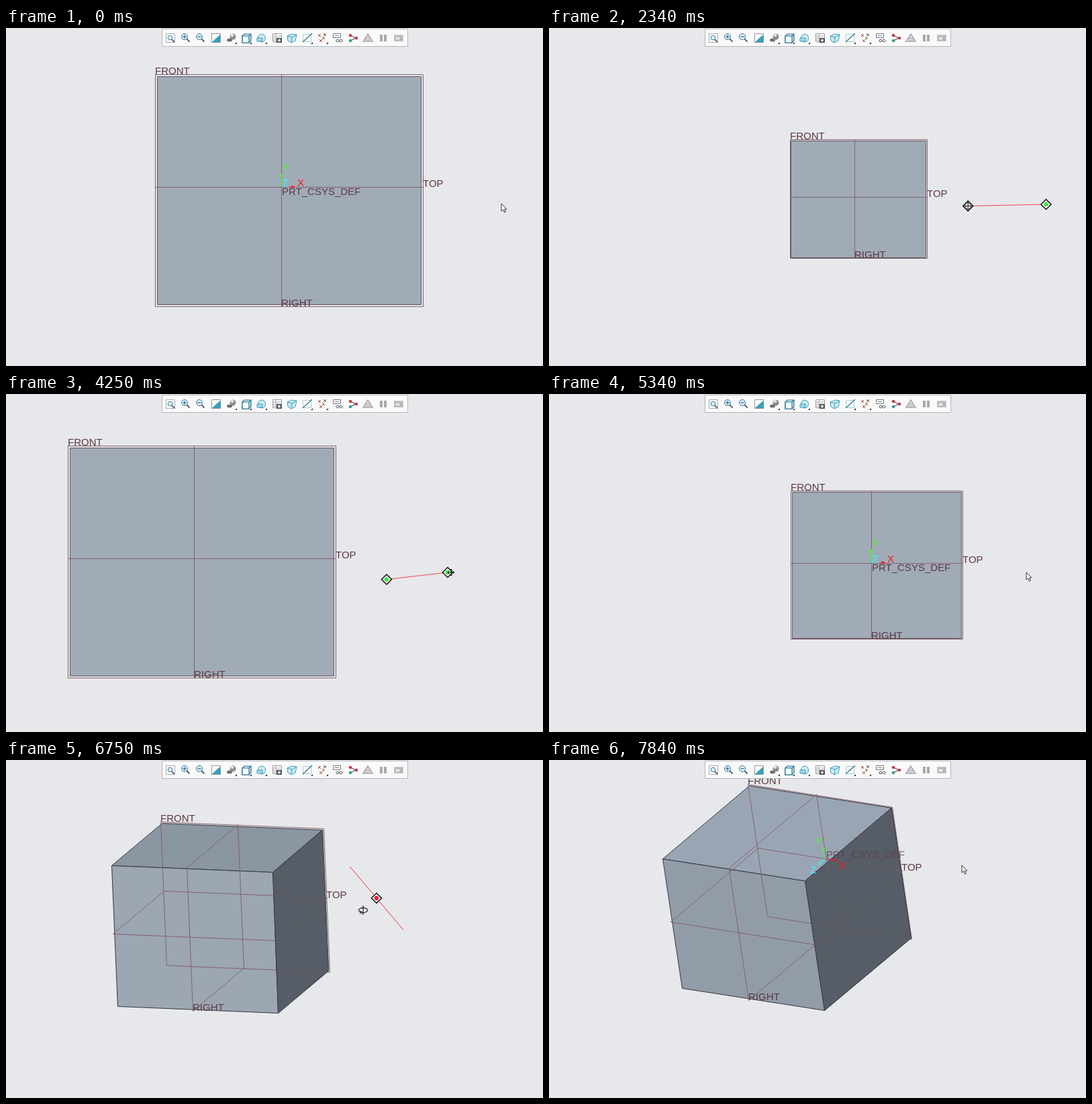
An HTML page with a canvas for the animation above (8 s loop, 800 by 504 pixels).

```html
<!DOCTYPE html>
<html lang="en">
<head>
<meta charset="utf-8">
<title>Model view navigation</title>
<style>
html, body { margin: 0; width: 100%; height: 100%; overflow: hidden; background: #e7e8eb; }
canvas { display: block; }
</style>
</head>
<body>
<canvas id="stage" width="800" height="504"></canvas>
<script>
const ctx = document.getElementById('stage').getContext('2d');
const FONT = '15px "Liberation Sans", Arial, sans-serif';
const MAROON = '#5c3844', PLANE = '#84626d';
const LOOP = 8000, BEATS = [340, 250, 170, 90, 0];

// Pointer path: time, x, y
const PATH = [
  [0, 738, 262], [340, 758, 275], [500, 759, 276], [840, 743, 264], [1090, 742, 264],
  [1340, 740.5, 263], [2000, 740.5, 263], [2340, 624.2, 265.4], [2500, 600, 268],
  [2750, 568.8, 276], [3000, 624, 272], [3500, 627, 272], [3840, 567, 276.5],
  [4000, 567, 276.5], [4250, 658, 266], [4340, 714, 266], [4500, 722, 266],
  [4750, 724, 265], [5000, 719, 266], [5250, 718, 265], [5340, 711, 266],
  [5500, 712, 267], [5840, 541, 264], [6000, 524, 263.4], [6250, 552, 206],
  [6340, 552, 206], [6750, 532, 224], [7340, 515, 239], [7500, 515, 239], [7840, 615, 157]
];
const PANS = [
  { from: 2000, to: 2750, lag: 0 },
  { from: 4000, to: 4750, lag: 5 },
  { from: 5500, to: 6000, lag: 0 }
];
const ZOOMS = [
  { times: [1000, 1090, 1170], factor: 0.8, x: 740.5, y: 263.4 },
  { times: [3170, 3340, 3500], factor: 1.25, x: 620, y: 271.1 },
  { times: [5170, 5250], factor: 0.8, x: 718.7, y: 265.7 }
];
const SPIN = { from: 6340, to: 7500, x: 552, y: 206, w: -139, axis: [0.645, 0.764], rate: 0.869 };

// Block and datum extents around the model origin, y pointing down
const BLOCK = { l: -185, r: 208, t: -165, b: 175, n: 0, f: 385 };
const DATUM = { l: -188, r: 211, t: -168, b: 178, n: -3, f: 388 };

const mix = (a, b, k) => a + (b - a) * k;
const rgb = (a, b, k) => `rgb(${a.map((v, i) => Math.round(mix(v, b[i], k)))})`;

function pointer(t) {
  const i = PATH.findIndex(p => p[0] > t);
  if (i < 0) return PATH[PATH.length - 1].slice(1);
  const a = PATH[i - 1], b = PATH[i], k = (t - a[0]) / (b[0] - a[0]);
  return [mix(a[1], b[1], k), mix(a[2], b[2], k)];
}

function viewAt(t) {
  let x = 410, y = 237, s = 1;
  ZOOMS.forEach((z, i) => {
    for (const at of z.times) if (t >= at) {
      x = z.x + (x - z.x) * z.factor;
      y = z.y + (y - z.y) * z.factor;
      s *= z.factor;
    }
    const pan = PANS[i];
    if (t >= pan.from) {
      const a = pointer(pan.from), b = pointer(Math.min(t, pan.to));
      x += b[0] - a[0];
      y += b[1] - a[1];
    }
  });
  let angle = 0;
  if (t > SPIN.from) {
    const [px, py] = pointer(Math.min(t, SPIN.to));
    angle = Math.hypot(px - SPIN.x, py - SPIN.y) * SPIN.rate * Math.PI / 180;
  }
  return { x, y, s, angle };
}

// Turn a vector about the spin axis lying in the screen plane
function turn(x, y, z, angle) {
  const [ax, ay] = SPIN.axis;
  const along = x * ax + y * ay;
  const across = (y * ax - x * ay) * Math.cos(angle) + z * Math.sin(angle);
  return [along * ax - across * ay, along * ay + across * ax];
}

function projector(v) {
  return (x, y, z) => {
    if (!v.angle) return [v.x + x * v.s, v.y + y * v.s];
    const p = turn(v.x - SPIN.x + x * v.s, v.y - SPIN.y + y * v.s, SPIN.w + z * v.s, v.angle);
    return [SPIN.x + p[0], SPIN.y + p[1]];
  };
}

function shape(points, fill, stroke, width = 1, closed = true) {
  ctx.beginPath();
  points.forEach(p => ctx.lineTo(p[0], p[1]));
  if (closed) ctx.closePath();
  if (fill) { ctx.fillStyle = fill; ctx.fill(); }
  if (stroke) { ctx.strokeStyle = stroke; ctx.lineWidth = width; ctx.stroke(); }
}
const line = (color, width, ...points) => shape(points, null, color, width, false);
const box = (x, y, w, h, fill, stroke) => shape([[x, y], [x + w, y], [x + w, y + h], [x, y + h]], fill, stroke);
const snap = p => p.map(c => Math.round(c - 0.01) + 0.5);

function ring(x, y, rx, ry, fill, stroke, width = 1) {
  ctx.beginPath();
  ctx.ellipse(x, y, rx, ry, 0, 0, 7);
  if (fill) { ctx.fillStyle = fill; ctx.fill(); }
  if (stroke) { ctx.strokeStyle = stroke; ctx.lineWidth = width; ctx.stroke(); }
}

function label(text, x, y, color = MAROON) {
  ctx.font = FONT;
  ctx.fillStyle = color;
  ctx.fillText(text, Math.round(x), Math.round(y));
}

function drawModel(v, at) {
  const quad = (pts, fill, stroke) => shape(pts.map(p => snap(at(...p))), fill, stroke);
  const { l, r, t, b, n, f } = BLOCK, d = DATUM;
  const k = v.angle / 0.75;
  const edge = v.angle ? '#34363d' : '#5c545f';
  const side = () => quad([[r, t, n], [r, t, f], [r, b, f], [r, b, n]], '#585d67', edge);
  if (v.angle) {
    quad([[l, t, n], [r, t, n], [r, t, f], [l, t, f]], rgb([122, 131, 142], [154, 165, 180], k), edge);
    side();
  }
  quad([[l, t, f], [r, t, f], [r, b, f], [l, b, f]], rgb([160, 171, 183], [146, 156, 169], k * k), edge);

  quad([[d.l, d.t, 0], [d.r, d.t, 0], [d.r, d.b, 0], [d.l, d.b, 0]], null, PLANE);
  quad([[d.l, 0, d.n], [d.r, 0, d.n], [d.r, 0, d.f], [d.l, 0, d.f]], null, PLANE);
  quad([[0, d.t, d.n], [0, d.b, d.n], [0, d.b, d.f], [0, d.t, d.f]], null, PLANE);
  if (v.angle) {
    // Datum lines barely show through the dark face
    ctx.globalAlpha = 0.7;
    side();
    ctx.globalAlpha = 1;
  }
  label('FRONT', ...at(d.l, d.t, 0));
  label('TOP', ...at(d.r, 0, 0));
  label('RIGHT', ...at(0, d.b, d.f));
}

function drawAxes(v, at) {
  const [x, y] = at(0, 0, 0);
  ctx.globalAlpha = v.angle ? 0.75 : 1;
  label('PRT_CSYS_DEF', x + 1, y + (v.angle ? -1 : 12));
  ctx.globalAlpha = 1;
  const axes = [['X', '#ff1018', [1, 0, 0]], ['Y', '#48ff20', [0, -1, 0]], ['Z', '#30fcff', [0, 0, 1]]];
  for (const [name, color, dir] of axes) {
    const [dx, dy] = v.angle ? turn(...dir, v.angle) : dir;
    const start = v.angle || name === 'Y' ? 0 : 13;
    const len = Math.hypot(dx, dy);
    if (len > 0.1) {
      const tip = [x + dx * 20, y + dy * 20];
      line(color, 1.2, [x + dx * start, y + dy * start], tip);
      for (const side of [-2, 2])
        line(color, 1, tip, [tip[0] - dx * 5 - dy * side, tip[1] - dy * 5 + dx * side]);
    }
    label(name, x + dx * 23 + (dx < -0.01 ? -11 : 1), y + dy * 23 + (dy > 0.01 ? 11 : -1), color);
  }
}

function diamond(x, y, dot) {
  shape([[x, y - 7.5], [x + 7.5, y], [x, y + 7.5], [x - 7.5, y]], '#fff', '#111', 1.5);
  if (dot) ring(x, y, 3.2, 3.2, dot);
}

function arrow(x, y) {
  shape([[0, 0], [0, 11], [2.6, 8.7], [4.6, 13], [6.4, 12.2], [4.5, 8], [8, 8]]
    .map(p => [x + p[0], y + p[1]]), '#fff', '#30323c');
}

function moveCross(x, y) {
  line('#111', 1, [x - 5, y], [x + 5, y]);
  line('#111', 1, [x, y - 5], [x, y + 5]);
  for (const [dx, dy] of [[1, 0], [-1, 0], [0, 1], [0, -1]])
    line('#111', 1, [x + dx * 3 - dy * 2, y + dy * 3 + dx * 2], [x + dx * 5, y + dy * 5],
      [x + dx * 3 + dy * 2, y + dy * 3 - dx * 2]);
}

function drawPointer(t) {
  const [x, y] = pointer(t);
  const pan = PANS.find(p => t >= p.from && t < p.to);
  if (pan) {
    const [ax, ay] = pointer(pan.from);
    line('#f04456', 1, [ax, ay], [x, y]);
    diamond(ax, ay, '#38e83c');
    diamond(x, y, pan.lag && '#38e83c');
    moveCross(x + pan.lag, y);
  } else if (t >= SPIN.from && t < SPIN.to) {
    const [ax, ay] = SPIN.axis.map(c => c * 62);
    line('#f0303c', 1, [SPIN.x - ax, SPIN.y - ay], [SPIN.x + ax, SPIN.y + ay]);
    diamond(SPIN.x, SPIN.y, '#f01c28');
    ring(x, y, 6.5, 3.5, '#fff', '#222', 1.3);
    line('#222', 1.3, [x, y - 7], [x, y + 7]);
    line('#222', 1.3, [x - 4, y + 1], [x - 2, y + 3.5], [x - 5, y + 5]);
  } else arrow(x, y);
}

const BLUE = '#2f7297', TEAL = '#3a9fb9', PALE = '#cdeaf2', DARK = '#50565c', GREY = '#a9a9a9';

function lens(x, y, r) {
  line(DARK, 1.8, [x + r * 0.7, y + r * 0.7], [x + r + 3, y + r + 3]);
  ring(x, y, r, r, '#e4f2f8', BLUE);
}
function cube(x, y, fill, stroke) {
  shape([[x - 6, y - 3], [x - 3, y - 6], [x + 7, y - 6], [x + 7, y + 4], [x + 4, y + 7], [x - 6, y + 7]], fill, stroke, 1.2);
  shape([[x - 6, y - 3], [x + 4, y - 3], [x + 4, y + 7], [x - 6, y + 7]], '#f4fafc', stroke, 1.2);
  line(stroke, 1.2, [x + 4, y - 3], [x + 7, y - 6]);
}
const menuMark = () => shape([[5, 9], [8, 9], [8, 6]], '#333');

// Each icon is drawn around its own centre
const ICONS = [
  () => { box(-6.5, -6.5, 13, 13, '#fff', '#a3aab0'); lens(-0.5, -0.5, 3.3); },
  () => { lens(-2, -2, 4.5); line(BLUE, 1.4, [-4.5, -2], [0.5, -2]); line(BLUE, 1.4, [-2, -4.5], [-2, 0.5]); },
  () => { lens(-2, -2, 4.5); line(BLUE, 1.4, [-4.5, -2], [0.5, -2]); },
  () => { box(-6.5, -6.5, 13, 13, '#fff', '#8a9499'); shape([[6, -5], [6, 6], [-6, 6], [-2, 2]], TEAL); },
  () => { ring(2, -2, 4.5, 4.5, '#8b8f93'); ring(-3, 3, 4, 2.5, '#6c7074'); ring(1, -4, 2.5, 2, '#e4e7e9'); menuMark(); },
  () => { cube(0, 0, PALE, '#22718e'); menuMark(); },
  () => { ring(0, 0, 5.5, 6, PALE, TEAL); shape([[-7, 0], [1, 0], [1, 5], [-7, 5]], '#a6d8e5', TEAL); menuMark(); },
  () => {
    box(-6.5, -6.5, 13, 12, '#fff', '#999');
    for (const y of [-3, 0, 3]) line('#aaa', 1, [-6, y], [6, y]);
    line('#aaa', 1, [-2, -6], [-2, 5]);
    box(-1, 0, 8, 7, DARK); ring(3, 3.5, 2, 2, '#eee');
  },
  () => {
    shape([[-7, -3], [0, -6], [7, -5], [5, 4], [-1, 7], [-6, 4]], PALE, TEAL);
    line(TEAL, 1, [-7, -3], [0, -1], [7, -5]); line(TEAL, 1, [0, -1], [-1, 7]);
  },
  () => { box(-6.5, -5.5, 12, 11, '#fff', '#a4cad6'); line('#34708f', 1.2, [-7, 6], [7, -7]); menuMark(); },
  () => {
    for (const [x, y, c] of [[-5, -4, '#9c4d3c'], [3, -5, '#4d4d4d'], [-3, 4, '#b04a3a'], [1, 0, '#8f6a30']]) {
      line(c, 1, [x - 2, y - 2], [x + 2, y + 2]); line(c, 1, [x - 2, y + 2], [x + 2, y - 2]);
    }
    menuMark();
  },
  () => {
    box(-6.5, -6.5, 11, 6, '#fff', '#777'); line('#777', 1, [-4, -3.5], [2, -3.5]);
    ring(0, 4, 2.2, 1.8, '#fff', DARK); ring(5, 4, 2.2, 1.8, '#fff', DARK);
  },
  () => {
    line('#555', 1.2, [-4, -4], [4, 0], [-4, 4]);
    ring(-4, -4, 2.3, 2.3, '#c93a42'); ring(5, 0, 2.3, 2.3, '#c93a42'); ring(-4, 4, 2.3, 2.3, '#3c9e88');
  },
  () => { shape([[0, -6], [7, 5], [-7, 5]], '#e4e4e4', GREY, 1.6); ring(0, 2, 2.5, 2.5, '#ddd', GREY); },
  () => { box(-5, -5, 4, 10, GREY); box(1, -5, 4, 10, GREY); },
  () => { box(-7, -5, 14, 10, '#c5c5c5'); box(-5, -2, 7, 5, '#e9e9e9', GREY); line(GREY, 1.5, [4, -3], [4, 4]); }
];

function drawToolbar() {
  box(232.5, 1.5, 366, 26, '#fafafb', '#b4b5b8');
  ICONS.forEach((icon, i) => {
    ctx.save();
    ctx.translate(Math.round(245 + i * 22.65), 15);
    icon();
    ctx.restore();
  });
}

function draw(now) {
  const time = now % LOOP, within = time % 500;
  const t = time - within + BEATS.find(b => b <= within);
  const view = viewAt(t), at = projector(view);
  ctx.fillStyle = '#e7e8eb';
  ctx.fillRect(0, 0, 800, 504);
  drawModel(view, at);
  const dragging = [...PANS, SPIN].some(p => t >= p.from && t < p.to);
  if (!dragging) drawAxes(view, at);
  drawToolbar();
  drawPointer(t);
}

function tick() {
  draw(performance.now());
  requestAnimationFrame(tick);
}
tick();
</script>
</body>
</html>
```
